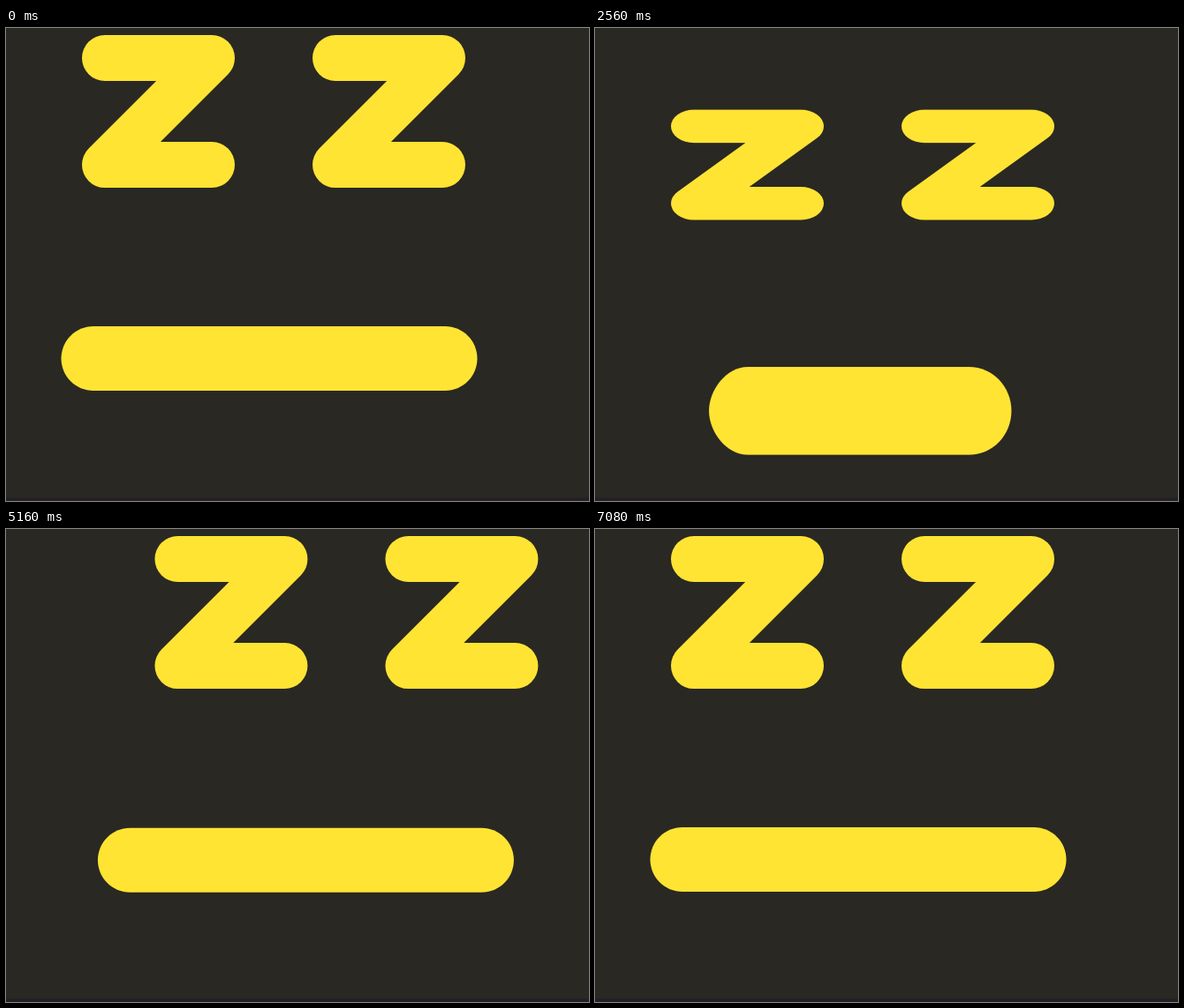
An HTML page with a canvas for the animation above (7.32 s loop, 660x536 px).

```html
<!DOCTYPE html>
<html lang="en">
<head>
<meta charset="utf-8">
<title>Sleepy face</title>
<style>
  html, body { margin: 0; width: 100%; height: 100%; overflow: hidden; background: #292823; }
  canvas { display: block; }
</style>
</head>
<body>
<canvas id="stage" width="660" height="536"></canvas>
<script>
const stage = document.getElementById('stage');
const screen2d = stage.getContext('2d');
const buffer = document.createElement('canvas');
buffer.width = stage.width;
buffer.height = stage.height;
const ctx = buffer.getContext('2d');

const YELLOW = '#ffe433', BACK = '#292823', EDGE = '#242024';
const LOOP = 7320, STEP = 40;
const NOD = 3850, WAKE = 3840, RISE = 330;
const SHAKE = 4234, SWING = 400, SETTLE = SHAKE + 1.5 * SWING;
const BLINKS = [644, 1469, 5934, 6665], BLINK = 300, EYE_LAG = 54;
const SAMPLES = 5, SHUTTER = 5;

const clamp = v => Math.min(1, Math.max(0, v));
const sine = u => (1 - Math.cos(Math.PI * clamp(u))) / 2;

// Shake twice, settle on the right, look left, return to the middle.
function look(t) {
  if (t < SHAKE) return 0;
  if (t < SETTLE) return 69.5 * (1 - Math.cos(2 * Math.PI * (t - SHAKE) / SWING));
  return 139 - 56 * sine((t - SETTLE) / 150)
             - 158 * sine((t - 5130) / 785)
             + 75 * sine((t - 5980) / 640);
}

const blink = t => BLINKS.reduce((open, start) =>
  open * (1 - .97 * Math.sin(Math.PI * clamp((t - start) / BLINK)) ** 2), 1);

function drawEye(x, y, open) {
  ctx.save();
  ctx.translate(x, y);
  ctx.scale(1, open);
  ctx.beginPath();
  ctx.moveTo(-60.5, -60.5);
  ctx.lineTo(60.5, -60.5);
  ctx.lineTo(-60.5, 60.5);
  ctx.lineTo(60.5, 60.5);
  ctx.stroke();
  ctx.restore();
}

// Bulging end of the mouth, from (x, y0) to (x, y1).
function cap(x, reach, y0, y1, bulge) {
  const y = (y0 + y1) / 2, lift = (y0 - y) * bulge, bend = x + reach * .552;
  ctx.bezierCurveTo(bend, y0, x + reach, y + lift, x + reach, y);
  ctx.bezierCurveTo(x + reach, y - lift, bend, y1, x, y1);
}

function drawMouth(x, bottom, yawn) {
  const top = bottom - 73 - 47.6 * yawn;
  const left = x + 99 + 132 * yawn, right = x + 497 - 131 * yawn;
  ctx.beginPath();
  ctx.moveTo(left, top);
  ctx.lineTo(right, top);
  cap(right, 36.5 + 20 * yawn, top, bottom, .552);
  ctx.lineTo(left, bottom);
  cap(left, -36.5 - 13 * yawn, bottom, top, .552 - .14 * yawn);
  ctx.fill();
}

function drawFace(t) {
  const nod = sine(t / NOD);
  const asleep = 1 - sine((t - WAKE) / RISE);
  const deep = nod ** 4 * asleep;
  const lids = 1 - .89 * deep;
  const drop = 81 * nod * asleep;
  const jaw = 2 * nod * asleep + 34 * deep;
  const x = look(t), mouthX = look(t - 14) / 2;
  const sag = .8 * clamp(Math.abs(mouthX) / 10);

  ctx.fillStyle = BACK;
  ctx.fillRect(0, 0, 660, 536);
  ctx.fillStyle = EDGE;
  ctx.fillRect(0, 532, 660, 4);

  ctx.fillStyle = ctx.strokeStyle = YELLOW;
  ctx.lineWidth = 52;
  ctx.lineCap = ctx.lineJoin = 'round';
  drawEye(172.5 + x, 94.5 + drop, lids * blink(t));
  drawEye(433.5 + x, 94.5 + drop, lids * blink(t - EYE_LAG));
  drawMouth(mouthX, 411 + drop + jaw + sag, nod ** 2 * asleep);
}

// Average a few nearby moments for motion blur.
function render(t) {
  for (let i = 0; i < SAMPLES; i++) {
    drawFace(t + SHUTTER * (i / (SAMPLES - 1) - .5));
    screen2d.globalAlpha = 1 / (i + 1);
    screen2d.drawImage(buffer, 0, 0);
  }
}

const begin = performance.now();
let shown = -1;
function tick() {
  const t = Math.floor(((performance.now() - begin) % LOOP) / STEP) * STEP;
  if (t !== shown) render(shown = t);
  requestAnimationFrame(tick);
}
tick();
</script>
</body>
</html>
```
